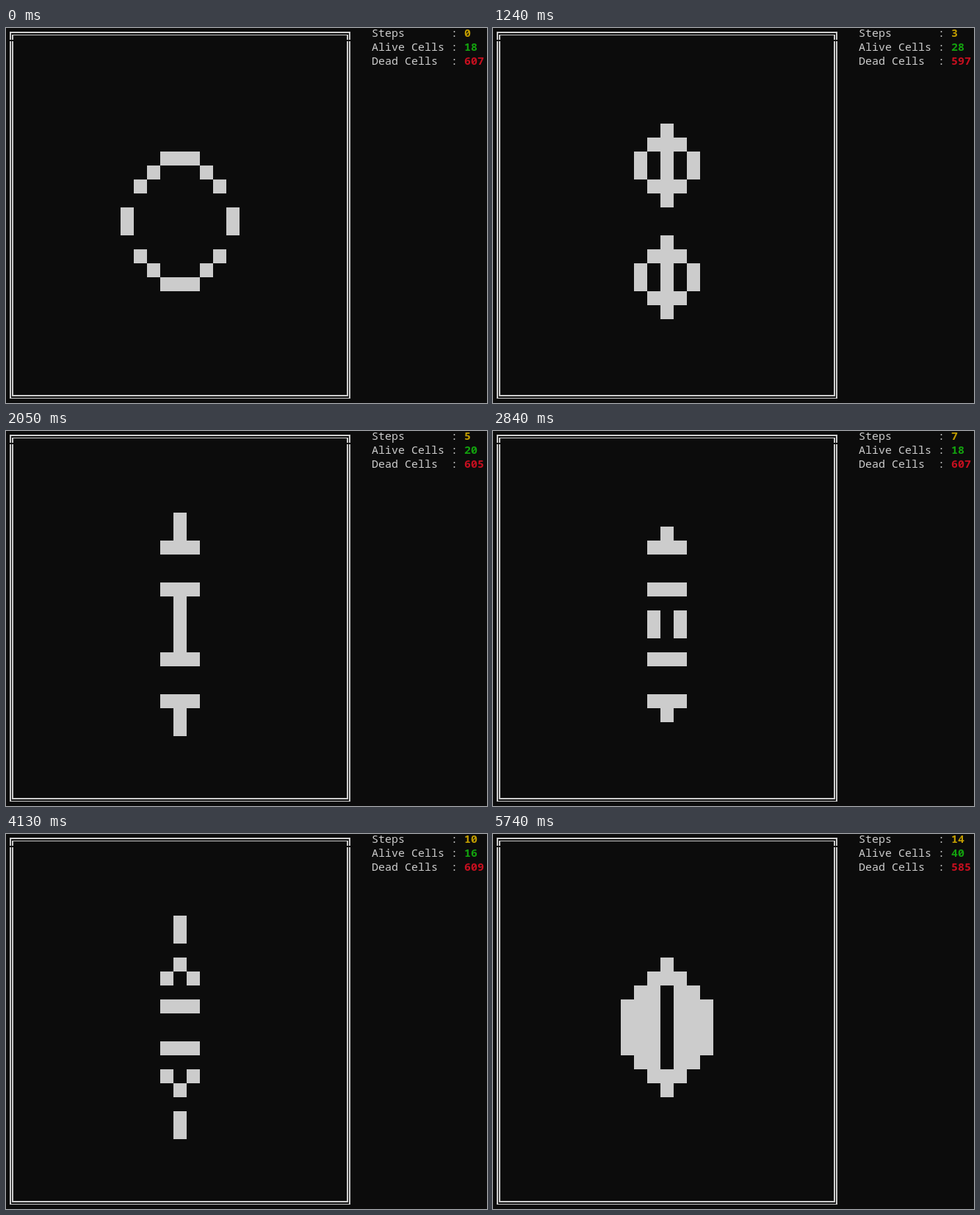
These frames come from a looping animation (655x510 px, 6150 ms). An HTML page:

```html
<!DOCTYPE html>
<html lang="en">
<head>
<meta charset="utf-8">
<title>Game of Life</title>
<style>
  html, body { margin: 0; width: 100%; height: 100%; overflow: hidden; background: #0c0c0c; }
  svg { display: block; }
  path { fill: #ccc; shape-rendering: crispEdges; }
  text { font: 15px "Noto Sans Mono", "DejaVu Sans Mono", monospace; fill: #ccc; }
  .num { font-weight: 600; }
  #steps { fill: #c19c00; }
  #alive { fill: #13a10e; }
  #dead { fill: #c50f1f; }
</style>
</head>
<body>
<svg width="655" height="510" viewBox="0 0 655 510">
  <path id="frame"/>
  <path id="cells"/>
  <text x="498" y="12">Steps</text><text x="606" y="12">:</text>
  <text x="498" y="31">Alive Cells</text><text x="606" y="31">:</text>
  <text x="498" y="50">Dead Cells</text><text x="606" y="50">:</text>
  <text class="num" id="steps" x="624" y="12">0</text>
  <text class="num" id="alive" x="624" y="31">18</text>
  <text class="num" id="dead" x="624" y="50">607</text>
</svg>
<script>
const SIZE = 25, CELL_W = 18, CELL_H = 19, LEFT = 12, TOP = 16;
const LOOP = 6150;
const starts = [0, 470, 840, 1240, 1640, 2050, 2450, 2840, 3330, 3730, 4130, 4540, 4940, 5340, 5740];
const $ = id => document.getElementById(id);
const box = (x, y, w, h) => `M${x} ${y}h${w}v${h}h${-w}z`;

// Double-line border; the top row of characters stands slightly apart.
const side = (x, top, bottom) => box(x, top, 2, 16 - top) + box(x, 18, 2, bottom - 18);
$('frame').setAttribute('d',
  box(5, 5, 464, 2) + box(8, 9, 458, 1) +
  box(8, 499, 458, 2) + box(5, 503, 464, 1) +
  side(5, 5, 504) + side(8, 9, 501) + side(464, 9, 501) + side(467, 5, 504));

// Distance of the live cells from the middle column, by row.
const seed = { 8: [0, 1], 9: [2], 10: [3], 12: [4], 13: [4], 15: [3], 16: [2], 17: [0, 1] };
const first = new Set();
for (const row in seed)
  for (const d of seed[row])
    for (const col of [12 - d, 12 + d]) first.add(row * SIZE + col);

function evolve(live) {
  const next = new Set();
  for (let row = 0; row < SIZE; row++)
    for (let col = 0; col < SIZE; col++) {
      let n = 0;
      for (let r = row - 1; r <= row + 1; r++)
        for (let c = col - 1; c <= col + 1; c++)
          if ((r !== row || c !== col) && r >= 0 && c >= 0 && r < SIZE && c < SIZE)
            n += live.has(r * SIZE + c);
      const i = row * SIZE + col;
      if (n === 3 || (n === 2 && live.has(i))) next.add(i);
    }
  return next;
}

const generations = [first];
while (generations.length < starts.length) generations.push(evolve(generations.at(-1)));

function show(step) {
  const live = generations[step];
  $('cells').setAttribute('d', [...live].map(i =>
    box(LEFT + i % SIZE * CELL_W, TOP + Math.floor(i / SIZE) * CELL_H, CELL_W, CELL_H)).join(''));
  $('steps').textContent = step;
  $('alive').textContent = live.size;
  $('dead').textContent = SIZE * SIZE - live.size;
}

let shown = 0, origin;
function tick(now) {
  origin ??= now;
  const t = (now - origin) % LOOP;
  const step = starts.findLastIndex(s => s <= t);
  if (step !== shown) show(shown = step);
  requestAnimationFrame(tick);
}
show(0);
requestAnimationFrame(tick);
</script>
</body>
</html>
```
